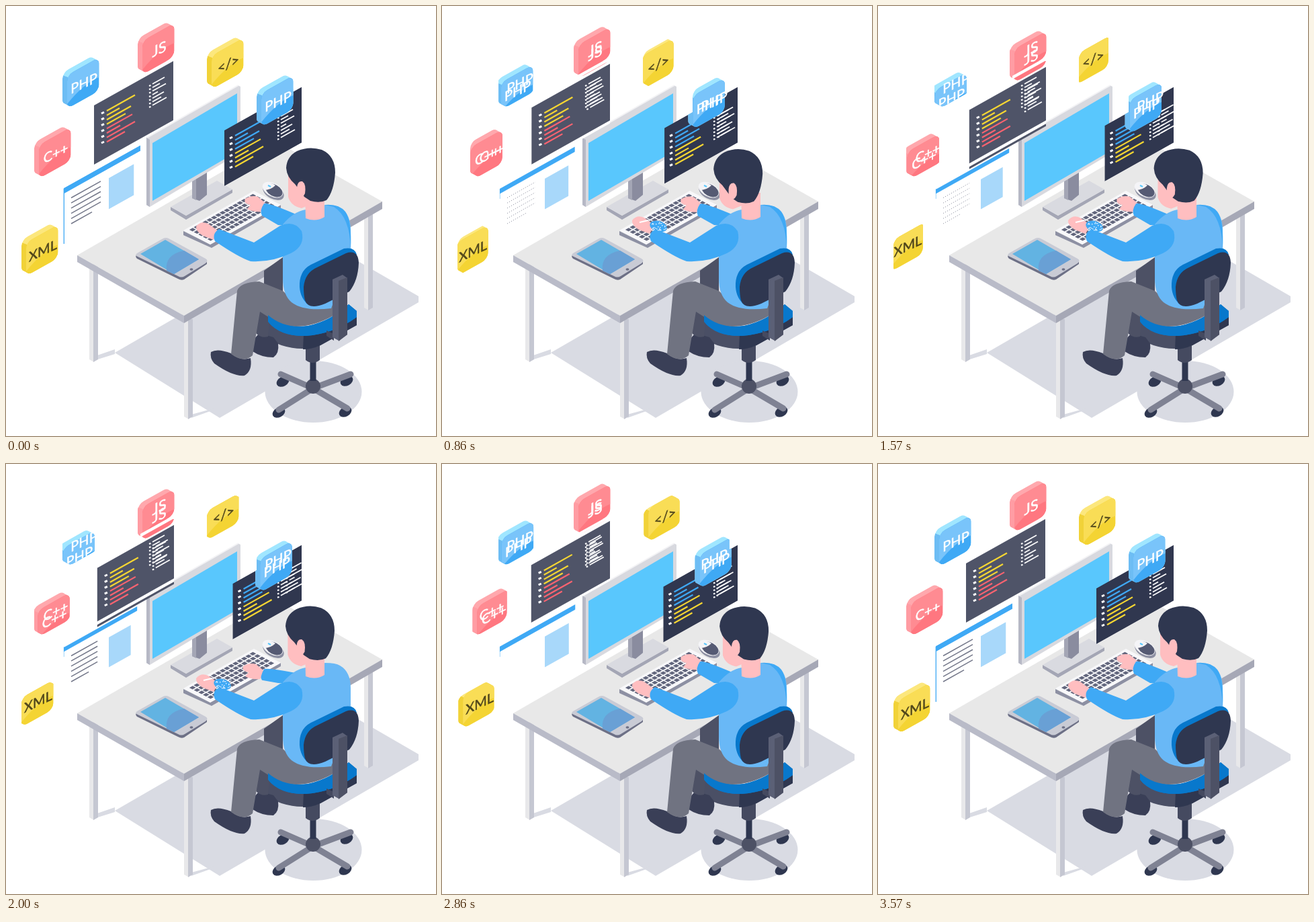
Recreate the animation shown at these times as an HTML page with a canvas. Size 640 by 640 pixels, loop 3640 ms.

```html
<!DOCTYPE html>
<html lang="en">
<head>
<meta charset="utf-8">
<title>Programmer at a desk</title>
<style>
html, body { margin: 0; width: 100%; height: 100%; overflow: hidden; background: #fff; }
canvas { display: block; width: 640px; height: 640px; }
</style>
</head>
<body>
<canvas id="stage" width="640" height="640"></canvas>
<script>
const ctx = document.getElementById('stage').getContext('2d');
const LOOP = 3640, STEPS = 51, SLOPE = 0.56;
const NAVY = '#2f3750', SLATE = '#4d5165', BLUE = '#3fa9f5', SHIRT = '#69b8f6', SKIN = '#ffbec0';
const YELLOW = '#f5d632', RED = '#fb6370', SHADOW = '#d9dbe3';
const LIGHT = '#e8e8ea', EDGE = '#c5c7d2';

function fill(color, d) {
  ctx.fillStyle = color;
  ctx.fill(new Path2D(d));
}

function line(color, width, x1, y1, x2, y2, cap = 'butt') {
  ctx.strokeStyle = color;
  ctx.lineWidth = width;
  ctx.lineCap = cap;
  ctx.beginPath();
  ctx.moveTo(x1, y1);
  ctx.lineTo(x2, y2);
  ctx.stroke();
}

function oval(color, x, y, rx, ry, turn = 0) {
  ctx.fillStyle = color;
  ctx.beginPath();
  ctx.ellipse(x, y, rx, ry, turn, 0, 7);
  ctx.fill();
}

function group(dx, dy, draw, clip) {
  ctx.save();
  if (clip) ctx.clip(clip);
  ctx.translate(dx, dy);
  draw();
  ctx.restore();
}

// Parallelogram with vertical sides and rising top and bottom edges.
function slab(x, y, w, h) {
  const rise = w * SLOPE;
  return `M${x} ${y}L${x + w} ${y - rise}V${y - rise + h}L${x} ${y + h}Z`;
}

function keyed(n, keys) {
  let i = 1;
  while (i < keys.length - 1 && keys[i][0] < n) i++;
  const [a, from] = keys[i - 1], [b, to] = keys[i];
  const p = Math.min(1, Math.max(0, (n - a) / (b - a)));
  return from + (to - from) * p * p * (3 - 2 * p);
}

function floorAndLegs() {
  fill(SHADOW, 'M162 516L318 613 614 441V432L500 366 330 419Z');
  fill(SHADOW, 'M130 522L162 511V518L133 527ZM276 608L309 599 318 612 304 603 276 613Z');
  oval(SHADOW, 457.5, 574, 72, 46);
  for (const [x, top, bottom] of [[124, 384, 530], [265, 466, 615], [533, 306, 453]]) {
    fill(LIGHT, `M${x} ${top}H${x + 7}V${bottom}L${x} ${bottom - 4}Z`);
    fill(EDGE, `M${x + 6} ${top}H${x + 13}V${bottom - 4}L${x + 6} ${bottom}Z`);
  }
}

function desk() {
  fill('#e8e8e8', 'M106 371L265 461 560 291 401 201Z');
  fill('#b9bbc8', 'M106 371L265 461V472L106 381Z');
  fill('#a6a8b6', 'M265 461L560 291V302L265 472Z');
}

function monitor() {
  fill('#a4a6b5', 'M245 299L268 312 337 273V278L268 318 245 304Z');
  fill('#d9dae0', 'M245 299L314 260 337 273 268 312Z');
  fill('#8a8c9f', 'M277 258L299 246V281L288 290 277 286Z');
  fill('#a4a6b5', 'M277 258H283V289L277 286Z');
  fill('#d8d9df', 'M209 196L345 118 349 120V218L214 299 209 296Z');
  fill('#b6b8c5', 'M209 196L214 199V299L209 296Z');
  line('#f3f3f5', 2, 210, 196, 346, 118);
  fill('#59c7fd', 'M218 204L344 130V217L218 290Z');
}

function tablet() {
  fill('#6d7086', 'M194 371L262 403 299 379V384L265 407Q261 409 256 406L195 376Q192 373 194 371Z');
  fill('#c9cbd5', 'M195 368L232 347Q238 343 244 347L297 376Q302 379 297 383L266 402Q261 405 256 402L196 373Q191 371 195 368Z');
  fill('#62b3e2', 'M200 369L237 348 287 377 250 399Z');
  fill('#69a0d5', 'M239 394Q236 370 265 364L287 377 250 399Z');
  oval('#6d7086', 276, 392, 2.5, 1.7);
}

function keyboard() {
  fill('#8d90a3', 'M264 335L304 355 409 296V301L306 360 264 341Z');
  fill('#f8f8fa', 'M264 334L369 275 409 296 304 355Z');
  ctx.save();
  ctx.transform(105, -59, 40, 21, 264, 334);
  ctx.fillStyle = '#62667d';
  for (let row = 0; row < 5; row++) {
    for (let col = 0; col < 15; col++) {
      ctx.fillRect(0.05 + col * 0.061, 0.09 + row * 0.168, 0.047, 0.12);
    }
  }
  ctx.restore();
}

function mouse() {
  oval('#8d90a3', 398, 277, 17, 10, 0.5);
  oval('#f4f4f7', 397, 273.5, 16.5, 10, 0.5);
  oval('#555a73', 399, 274.5, 13.5, 8.5, 0.5);
  fill('#f4f4f7', 'M384 270Q386 261 398 265L401 267Q394 274 384 274Z');
  line('#59c7fd', 2, 390, 267, 394, 269);
}

const panels = [
  { x: 131, y: 148, w: 118, h: 88, color: '#4f5468', bullet: 144, top: 159, code: 150, side: 214, sideTop: 119, inks: [YELLOW, RED] },
  { x: 325, y: 185, w: 115, h: 83, color: '#30374f', bullet: 335, top: 196, code: 341, side: 405, sideTop: 167, inks: [BLUE, YELLOW] }
];

function sideNotes(p) {
  [18, 11, 20, 8, 17, 13, 21].forEach((len, i) => {
    const y = p.sideTop + i * 5.3;
    line('#fff', 2.2, p.side - 1, y, p.side + 1.5, y - 1);
    line('#fff', 1.7, p.side + 4, y - 3, p.side + 4 + len, y - 3 - len * SLOPE);
  });
}

function panelBody(p) {
  fill(p.color, slab(p.x, p.y, p.w, p.h));
  for (let i = 0; i < 6; i++) {
    const y = p.top + i * 8.8;
    line('#fff', 3, p.bullet - 2, y + 1, p.bullet + 2, y - 1);
  }
  [42, 19, 36, 28, 38, 20, 42, 27].forEach((len, i) => {
    const y = p.top - 3 + i * 6.6;
    line(p.inks[i >> 2], 2.2, p.code, y, p.code + len, y - len * SLOPE);
  });
  sideNotes(p);
}

function leftPanel(s) {
  const p = panels[0], dy = 7 * s, bounds = new Path2D();
  bounds.rect(131, 60, 119, 190);
  group(5 * s, dy, () => panelBody(p), bounds);
  if (s < 0.08) return;
  group(0, 0, () => sideNotes(p));
  const gap = Math.min(dy + 1, 5), low = p.y + p.h + 1;
  fill('#fff', slab(p.x, low, p.w + 1, gap));
}

function rightPanel(s) {
  const p = panels[1];
  const bounds = new Path2D(slab(p.x, p.y, p.w, p.h));
  group(13 * s, -13 * SLOPE * s, () => panelBody(p), bounds);
  if (s > 0.02) sideNotes(p);
}

function browser(s, n) {
  const dx = -5 * s, dy = 5 * s;
  const moved = (color, d) => group(dx, dy, () => fill(color, d), new Path2D(d));
  moved(BLUE, slab(86, 271, 114, 8.5));
  moved('#a8d8fa', slab(153, 256, 37.5, 46.5));
  const still = n < 4 || n > 40;
  line(BLUE, still ? 1.3 : 0.5, 86.3, 272, 86.3, n < 12 || n > 40 ? 354 : 287);
  if (n > 31 && n < 41) return;
  ctx.save();
  if (n > 3 && n < 25) ctx.setLineDash([1.2, 2.2]);
  const width = n > 3 && n < 25 ? 0.8 : 1.5;
  [44, 44, 44, 44, 44, 31].forEach((len, i) => {
    const y = 285.5 + i * 7.7;
    line('#737789', width, 97, y, 97 + len + dx, y - (len + dx) * SLOPE);
  });
  ctx.restore();
}

const red = { front: '#ff7780', gloss: '#ff8b92', side: '#ff9ca3', top: '#ffa8ad', ink: '#fff' };
const blue = { front: BLUE, gloss: '#79c4fa', side: '#6dbdf4', top: '#a0e6ff', ink: '#fff' };
const yellow = { front: '#f4d433', gloss: '#f9dd56', side: '#f1d238', top: '#fce77d', ink: '#51471b' };

// Orbits are a (1 - cos) swing plus a sine part on each axis.
const drift = { x: [-1.9, -4.9], y: [5.5, -1.5], ghostEnd: 49 };
const climb = { x: [-4.6, -4.6], y: [-4.5, 5] };
const icons = [
  { x: 196, y: 22, label: 'JS', skin: red, orbit: { x: [0, 0], y: [6.3, 0], ghostEnd: 42 }, split: true },
  { x: 84, y: 73, label: 'PHP', skin: blue, orbit: { x: [-3.5, 0], y: [11.8, 0], ghostEnd: 42 } },
  { x: 42, y: 177, label: 'C++', skin: red, orbit: drift },
  { x: 299, y: 44, label: '</>', skin: yellow, orbit: climb },
  { x: 23, y: 322, label: 'XML', skin: yellow, orbit: climb },
  { x: 373, y: 100, label: 'PHP', skin: blue, orbit: drift, over: panels[1] }
];

function tile(dx, dy) {
  const face = new Path2D(), shape = new Path2D();
  face.roundRect(0, 0, 47.5, 50, 9);
  shape.addPath(face, new DOMMatrix([1, -SLOPE, 0, 1, 7 + dx, 30 + dy]));
  return shape;
}

function hull() {
  const shape = new Path2D();
  for (let i = 0; i <= 7; i += 0.5) shape.addPath(tile(-i, -i * 0.55));
  return shape;
}
const hullShape = hull(), faceShape = tile(0, 0);

function iconLabel(icon) {
  ctx.save();
  ctx.transform(1, -0.47, 0, 1, 32, 42);
  ctx.font = `${icon.label === 'JS' ? 22 : 20}px Lato, sans-serif`;
  ctx.textAlign = 'center';
  ctx.textBaseline = 'middle';
  ctx.fillStyle = ctx.strokeStyle = icon.skin.ink;
  ctx.lineWidth = 0.5;
  ctx.fillText(icon.label, 0, 1);
  ctx.strokeText(icon.label, 0, 1);
  ctx.restore();
}

function iconBody(icon) {
  const { front, gloss, side, top } = icon.skin;
  ctx.fillStyle = top;
  ctx.fill(hullShape);
  ctx.save();
  ctx.clip(hullShape);
  fill(side, 'M0 30L8 33V82H0Z');
  ctx.restore();
  ctx.fillStyle = front;
  ctx.fill(faceShape);
  ctx.save();
  ctx.clip(faceShape);
  fill(gloss, 'M0 0H60V31Q34 39 7 73H0Z');
  ctx.restore();
  iconLabel(icon);
}

function drawIcon(icon, n, swing, sine) {
  const { x, y, ghostEnd } = icon.orbit;
  const dx = x[0] * swing + x[1] * sine, dy = y[0] * swing + y[1] * sine;
  const bounds = new Path2D();
  bounds.addPath(hullShape);
  if (icon.split) bounds.rect(0, 60, 54.5, 60);
  if (icon.over) {
    const p = icon.over;
    bounds.addPath(new Path2D(slab(p.x - icon.x, p.y - icon.y, p.w, p.h)));
  }
  ctx.save();
  ctx.translate(icon.x, icon.y);
  group(0, 0, () => {
    ctx.translate(dx, dy);
    iconBody(icon);
  }, bounds);
  if (ghostEnd && n > 0 && n < ghostEnd) iconLabel(icon);
  if (icon.split && dy > 1) fill('#fff', slab(4, 82, 51, Math.min(dy, 5)));
  ctx.restore();
}

function legs() {
  fill('#3a3f57', 'M367 498L377 487 398 493 405 502Q407 517 398 523 380 523 367 514Z');
  fill(SLATE, 'M384 394L412 374V428L384 417ZM377 452L393 462 390 492Q380 495 372 487Z');
  fill('#3a3f57', 'M305 515Q315 509 335 517 349 529 364 524 367 543 355 550 338 552 310 532 303 524 305 515Z');
  fill('#707381', 'M344 424Q348 411 377 410L412 424Q440 452 489 444L487 461Q446 484 408 474L378 455 367 520Q354 532 335 518Z');
}

function chairBase() {
  for (const [x, y] of [[412, 559], [507, 558], [406, 605], [505, 604]]) {
    oval(NAVY, x, y, 10, 7, -0.5);
  }
  const ends = [[409, 548], [513, 548], [406, 601], [508, 599]];
  for (const [x, y] of ends) line('#7f8293', 9, 457, 569, x, y, 'round');
  oval(SLATE, 457, 566, 11, 11);
  line(NAVY, 9, 457, 525, 457, 558);
  fill('#454a60', 'M446 495H467V527Q456 535 446 527Z');
}

function chairSeat() {
  fill('#4a4f65', 'M379 453L392 465Q438 498 522 458V475L468 505Q442 515 410 505 382 495 378 478Z');
  fill(NAVY, 'M443 488Q486 482 522 458V475L468 505Q455 511 442 511Z');
  fill('#0878cc', 'M390 459Q414 481 450 476 483 469 510 444L522 454V463Q488 488 446 491 408 492 390 470Z');
}

function chairBack() {
  fill('#0878cc', 'M437 413Q438 391 458 383L503 361Q519 358 522 370L470 444 449 444Q436 432 437 413Z');
  fill(NAVY, 'M443 418Q445 397 463 389L506 368Q524 362 525 382 524 409 511 425L475 443Q450 453 445 438 443 430 443 418Z');
  fill('#454a60', 'M477 483L488 488V498L477 491Z');
  fill('#5b6076', 'M486 407L501 400 508 405V489L495 498 486 493Z');
  fill(SLATE, 'M495 409L508 404V489L495 499Z');
}

function torso(sleeve) {
  fill(SHIRT, 'M412 325Q428 306 446 303L475 296Q491 296 497 300 513 309 513 334V374L484 450Q443 455 425 441 412 430 412 405Z');
  if (sleeve) fill(BLUE, 'M474 296Q495 294 505 306 515 320 513 362 512 314 488 299Z');
}

function farArm(n) {
  const dip = keyed(n, [[0, 0], [8, 1], [17, 0], [24, 0], [28, 14], [32, 0], [50, 0]]);
  group(-dip * 0.2, dip, () => {
    fill(SKIN, 'M356 287Q365 281 375 284L388 295 381 306Q367 307 359 302L364 296Q353 294 356 287Z');
  });
  fill(BLUE, `M384 ${294 + dip * 0.8}Q390 ${292 + dip * 0.8} 436 312L420 327 405 326 381 ${312 + dip * 0.7}Q377 ${304 + dip} 384 ${294 + dip * 0.8}Z`);
}

function nearArm(n) {
  const raised = n > 4 && n < 40;
  group(0, raised ? -9 : 0, () => {
    fill(SKIN, 'M283 328Q290 319 301 324L316 335 309 348 293 342Q282 335 283 328Z');
    if (raised) line('#fff', 2, 294, 331, 307, 328);
  });
  fill(BLUE, 'M317 332L369 352 408 327Q429 318 440 335 446 357 424 368 395 382 364 380 346 374 311 350 306 339 317 332Z');
  if (!raised) return;
  oval(BLUE, 322, 328, 13, 8, 0.3);
  let seed = 17;
  const random = () => (seed = seed * 16807 % 2147483647) / 2147483647;
  ctx.fillStyle = '#e5f3ff';
  for (let i = 0; i < 32; i++) {
    ctx.fillRect(Math.round(312 + random() * 24), Math.round(321 + random() * 13), 1.4, 1.4);
  }
}

function head(n) {
  const lean = keyed(n, [[0, 0], [8, -11], [13, -13], [17, -12.5], [26, -2], [30, 0], [38, 0], [43, -11], [46, -11], [49, 0], [50, 0]]);
  fill(SKIN, 'M445 278H474V314Q461 322 446 316Z');
  group(lean * 0.55, -lean * 0.12, () => {
    fill(SKIN, 'M420 242V284Q424 298 440 301L462 292 455 240Z');
  });
  group(lean, -lean * 0.13, () => {
    fill(NAVY, 'M417 241Q418 224 433 216 451 208 470 214 490 223 490 248 488 276 477 289 467 294 453 290L444 284 433 269 430 265Q418 255 417 241Z');
  });
  group(lean * 0.5, -lean * 0.2, () => {
    fill(SKIN, 'M433 270Q434 260 441 261 447 265 445 279 441 288 433 286Z');
  });
}

function render(time) {
  const n = Math.min(STEPS - 1, Math.floor(((time + 2) % LOOP) * STEPS / LOOP));
  const angle = n / (STEPS - 1) * Math.PI * 2;
  const swing = 1 - Math.cos(angle), sine = Math.sin(angle), s = swing / 2;
  ctx.fillStyle = '#fff';
  ctx.fillRect(0, 0, 640, 640);
  floorAndLegs();
  desk();
  monitor();
  browser(s, n);
  leftPanel(s);
  rightPanel(s);
  for (const icon of icons) drawIcon(icon, n, swing, sine);
  tablet();
  keyboard();
  mouse();
  chairBase();
  chairSeat();
  farArm(n);
  legs();
  torso(n < 25 || n > 38);
  fill('#0878cc', 'M390 460Q414 481 450 476 483 469 510 444L522 454V463Q488 488 446 491 408 492 390 470Z');
  nearArm(n);
  head(n);
  chairBack();
}

let start;
function tick(now) {
  start ??= now;
  render(now - start);
  requestAnimationFrame(tick);
}
render(0);
requestAnimationFrame(tick);
</script>
</body>
</html>
```
